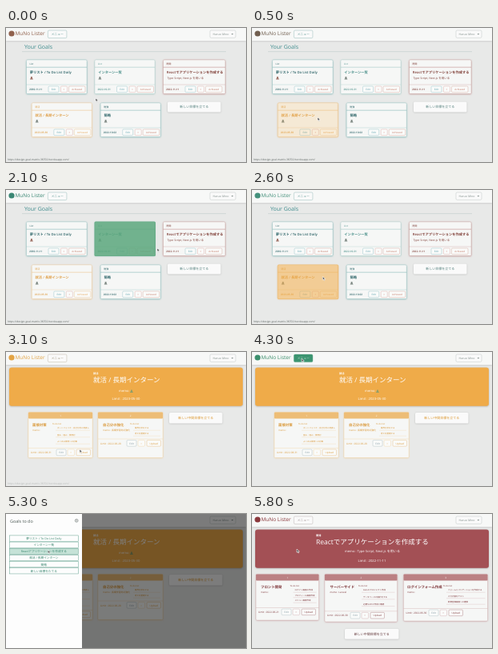
An HTML page for the animation above (6 s loop, 300 by 168 pixels).

```html
<!DOCTYPE html>
<html lang="ja">
<head>
<meta charset="utf-8">
<title>Goals</title>
<style>
html, body { margin: 0; width: 100%; height: 100%; overflow: hidden; background: #e8e9e8; }
svg { display: block; width: 100vw; height: 100vh; }
text { font-family: "Open Sans", "Noto Sans CJK JP", "Noto Sans CJK", sans-serif; text-rendering: geometricPrecision; }
</style>
</head>
<body>
<svg id="stage" viewBox="0 0 300 168"></svg>
<script>
const LOOP = 6000;
const TEAL = '#4a9798', RED = '#a35a58', ORANGE = '#efab49';

const rect = (x, y, w, h, fill, extra = '') =>
  `<rect x="${x}" y="${y}" width="${w}" height="${h}" fill="${fill}" ${extra}/>`;
const text = (x, y, size, fill, str, extra = '') =>
  `<text x="${x}" y="${y}" font-size="${size}" fill="${fill}" ${extra}>${str}</text>`;
const line = (x1, y, x2, color, w = 0.4) =>
  `<path d="M${x1} ${y}H${x2}" stroke="${color}" stroke-width="${w}"/>`;
const group = (id, body, extra = '') => `<g id="${id}" ${extra}>${body}</g>`;
const MID = 'text-anchor="middle"';
const BOLD = 'font-weight="600"';

function button(x, y, w, label, color, h = 7.6) {
  return rect(x, y, w, h, '#fafbfa', `rx="1.2" stroke="${color}" stroke-width=".35" stroke-opacity=".8"`) +
    text(x + w / 2, y + h / 2 + 1.1, 3.1, color, label, MID);
}

function glow(x, y, w, h, color) {
  return rect(x, y + .4, w, h, color, 'rx="1.5" opacity=".6" filter="url(#blur)"') +
    rect(x, y, w, h, '#f6f7f6', `rx="1.2" stroke="${color}" stroke-width=".5" stroke-opacity=".4"`);
}

const bag = (x, y, color) =>
  `<path d="M${x + 1} ${y}h1.8v1.2l1.1 2.4h-4l1.1-2.4z" fill="${color}" opacity=".8"/>`;

function addButton(x, y, w, h, label, color) {
  return rect(x, y + .5, w, h, '#777', 'rx="1.5" opacity=".35" filter="url(#blur)"') +
    rect(x, y, w, h, '#fafafa', 'rx="1.5"') +
    text(x + w / 2, y + h / 2 + 1.4, 4, color, label, MID + ' font-weight="500"');
}

// Goal cards of the home page
const goals = [
  { x: 25.5, y: 40, w: 75.5, c: TEAL, ink: '#2f666a', tag: 'List', name: '夢リスト / To Do List Daily', date: '2030-11-11' },
  { x: 111, y: 40, w: 75, c: '#78b0a9', ink: '#4c918b', fill: '#5aa67c', tag: 'List', name: 'インターン一覧', date: '2022-10-31' },
  { x: 196.5, y: 40, w: 77.5, c: RED, ink: '#804039', tag: '開発', name: 'Reactでアプリケーションを作成する', memo: 'Type Script, Next.js を用いる', date: '2022-11-11' },
  { x: 32.3, y: 94, w: 75, c: '#e6a95a', ink: '#dfa04a', fill: ORANGE, tag: '就活', name: '就活 / 長期インターン', date: '2023-05-30' },
  { x: 118.2, y: 94, w: 75, c: TEAL, ink: '#2f666a', tag: '勉強', name: '簡略', date: '2022-10-02' }
];

function goalCard(g, i) {
  const { x, y, w, c, ink } = g;
  const body = glow(x, y, w, 42.5, c) +
    text(x + 4, y + 6, 3, ink, g.tag) +
    line(x, y + 9.2, x + w, c, .4) +
    text(x + 4.3, y + 17, 4.25, ink, g.name, BOLD) +
    (g.memo ? text(x + 5, y + 24.2, 3.5, ink, g.memo) : bag(x + 4.5, y + 21, i ? '#65706b' : '#8a5143')) +
    line(x, y + 31, x + w, c, .2) +
    text(x + 3.5, y + 38, 3.15, ink, g.date, BOLD) +
    button(x + 27.5, y + 33, 13, 'Edit', '#5a9fab') +
    button(x + 43, y + 33, 8, '×', '#cf8178') +
    button(x + 53, y + 33, 20.5, 'Achieved', i === 3 ? '#e3a150' : '#c27865');
  const cover = g.fill
    ? group('cover' + i, rect(x - .5, y - .5, w + 1.5, 43.5, g.fill, 'rx="1.5"'), 'opacity="0"') : '';
  return body + cover;
}

const home = text(23, 25.6, 7, '#3f8d8e', 'Your Goals') +
  line(20, 29.6, 275, '#b7c7c4', .5) +
  goals.map(goalCard).join('') +
  addButton(202, 92.5, 66.5, 13, '新しい目標を立てる', '#55817e');

// Detail page pieces
function hero(color, x, memoY, tag, name, memo, limit) {
  return rect(4, 20, 292, 48.3, '#777', 'rx="3" opacity=".5" filter="url(#blur)"') +
    rect(4, 19.5, 292, 48.3, color, 'rx="3"') +
    text(x, 27.8, 3.2, '#fff', tag, BOLD) +
    text(x, 37.7, 8.5, '#fff', name, 'font-weight="500"') +
    text(150.5, memoY, 4.1, '#fff', memo, MID) +
    text(150, 60, 4.2, '#fff', limit, MID);
}

function stepCard(s, color, ink) {
  const { x, w, b, row, tx, col } = s, y = 75.5;
  return glow(x, y, w, b - y, color) +
    rect(x, y, w, 8, color, 'rx="1"') +
    text(x + w / 2, y + 5.2, 3, '#fff', s.n, MID) +
    text(tx, 93.2, 4.4, ink, s.name, BOLD) +
    text(tx, 99.3, 2.9, ink, s.memo) +
    text(col, 90.6, 2.7, ink, 'To do list') +
    s.todo.map((t, i) => text(col + 6, 96.3 + i * s.gap, 2.5, ink, t, 'font-weight="500"') +
      line(col + 4, 98.2 + i * s.gap, x + w - 3, color, .2)).join('') +
    line(x, row - 5.5, x + w, color, .25) +
    text(x + 3, row + 1.1, 3.1, ink, 'Limit : ' + s.date) +
    button(s.edit, row - 3.9, 12, 'Edit', '#8198a0') +
    button(s.edit + 14, row - 3.9, 8.5, '×', color) +
    button(s.edit + 25, row - 3.9, 17.5, 'Upload', ink);
}

const internSteps = [
  { n: 1, x: 28, w: 80, b: 132.5, row: 126, tx: 33, col: 58, edit: 63, gap: 8.5, name: '面接対策', memo: 'memo :', date: '2022-08-31',
    todo: ['ポートフォリオ・自己分析の見直し', '強み・弱み・質問対', 'よくある質問への対策'] },
  { n: 2, x: 115, w: 81, b: 132.5, row: 114.5, tx: 121, col: 155, edit: 151, gap: 7, name: '自己分の強化', memo: 'memo : 長期学習対応強化', date: '2022-06-28',
    todo: ['業界分析をする', '考えを整理する'] }
];
const reactSteps = [
  { n: 1, x: 5, w: 78.5, b: 133, row: 123, tx: 11, col: 47.5, edit: 37, gap: 6.5, name: 'フロント開発', memo: 'memo :', date: '2022-06-21',
    todo: ['ログイン画面の作成', 'プロフィール画面作成', 'メニュー画面作成'] },
  { n: 2, x: 91, w: 90.5, b: 135, row: 127.3, tx: 97.5, col: 133, edit: 123, gap: 8.7, name: 'サーバーサイド', memo: 'memo : Laravel', date: '2022-06-30',
    todo: ['Railsのプロジェクト作成', 'データベースの設計をする', '必要なAPIの作成と確認'] },
  { n: 3, x: 189.5, w: 105, b: 134, row: 124, tx: 194, col: 239, edit: 221, gap: 7.5, name: 'ログインフォーム作成', memo: 'memo :', date: '2022-06-30',
    todo: ['フォームとバリデーションを作成する', '入力内容をテスト', '新規登録画面への遷移'] }
];

const intern = hero(ORANGE, 109, 50.3, '就活', '就活 / 長期インターン', 'memo : &#160;&#160;&#160;', 'Limit : 2023-05-30') +
  bag(155, 47.4, '#7c9b6c') +
  group('internSteps', internSteps.map(s => stepCard(s, '#edbd76', '#d99737')).join('') +
    addButton(204, 76, 66.5, 13.5, '新しい中間目標を立てる', '#dc982f'));

const react = hero('#a35055', 80, 47.6, '開発', 'Reactでアプリケーションを作成する',
    'memo : Type Script, Next.js を用いる', 'Limit : 2022-11-11') +
  group('reactSteps', reactSteps.map(s => stepCard(s, '#bb8083', '#7c3236')).join('') +
    addButton(116, 144, 67.5, 12.8, '新しい中間目標を立てる', '#63383b'));

const header = rect(0, 0, 300, 16.6, '#777', 'opacity=".3" filter="url(#blur)"') +
  rect(0, 0, 300, 16, '#f7f8f7') +
  group('logo', '<circle cx="7" cy="7" r="3.6"/><text x="11.5" y="9.2" font-size="6.5">MuNo Lister</text>') +
  group('menu', '<rect x="52.4" y="3" width="23.5" height="9.6" rx="1.5" stroke-width=".35"/>' +
    `<text x="64.2" y="9.2" font-size="3.9" ${MID}>メニュー</text>`) +
  rect(255, 3, 32, 9.3, '#fafafa', 'rx="1.5" stroke="#a9b1af" stroke-width=".35"') +
  text(258.5, 8.9, 3.6, '#84908d', 'Haruo Mino') +
  '<path d="M281.5 7h2.8l-1.4 1.6z" fill="#84908d"/>';

// Side panel
const PANEL = 95, ROW = 8.15;
const rowY = i => 26.9 + i * ROW;
const rowNames = goals.map((g, i) => i === 2 ? 'Reactアプリケーションを作成する' : g.name)
  .concat('新しい目標をたてる');
const panel = rect(0, 0, PANEL, 168, '#fdfdfd') +
  text(5, 10.5, 5.4, '#4a5652', 'Goals to do') +
  '<circle cx="88.2" cy="8.3" r="1.9" fill="none" stroke="#4a5652" stroke-width=".5"/>' +
  '<path d="M87.4 7.5l1.6 1.6m0-1.6l-1.6 1.6" stroke="#4a5652" stroke-width=".4"/>' +
  rowNames.map((name, i) =>
    rect(4.3, rowY(i), 86, 7.3, '#fdfdfd', `id="row${i}" stroke="#65a28f" stroke-width=".5"`) +
    text(47.3, rowY(i) + 5, 3.7, '#3c8871', name, MID)).join('');

const stage = document.getElementById('stage');
stage.innerHTML =
  '<defs><filter id="blur" x="-20%" y="-20%" width="140%" height="150%"><feGaussianBlur stdDeviation="1.2"/></filter></defs>' +
  rect(0, 0, 300, 168, '#e8e9e8') + header +
  group('home', home) + group('intern', intern) + group('react', react) +
  group('url', text(2, 165.6, 3.3, '#5c6461', 'https://design-goal-matrix-38702.herokuapp.com/')) +
  group('shade', rect(0, 0, 300, 168, '#000')) +
  group('panel', panel) +
  group('cursor', '<path d="M0 0v4.2l1.1-1 .8 1.8.7-.3-.8-1.8h1.5z" fill="#444" stroke="#fff" stroke-width=".6"/>');

const el = id => document.getElementById(id);
const show = (id, on) => el(id).setAttribute('display', on ? 'inline' : 'none');
const set = (node, attrs) => { for (const k in attrs) node.setAttribute(k, attrs[k]); };
const clamp = v => Math.max(0, Math.min(1, v));
const ramp = (t, from, to) => clamp((t - from) / (to - from));
const smooth = p => p * p * (3 - 2 * p);

// Values keyed by time: [time, ...numbers]
function track(keys, t, ease = p => p) {
  let i = 0;
  while (i < keys.length - 2 && t >= keys[i + 1][0]) i++;
  const a = keys[i], b = keys[i + 1], p = ease(ramp(t, a[0], b[0]));
  return a.slice(1).map((v, k) => v + (b[k + 1] - v) * p);
}

const inkKeys = [[0, 145, 98, 78], [1200, 69, 91, 83], [2100, 58, 135, 116], [2899, 75, 151, 128],
  [2900, 224, 164, 72], [3200, 228, 164, 67], [4200, 61, 145, 111], [5599, 55, 135, 104],
  [5600, 139, 57, 61], [6000, 139, 57, 61]];
const mouseKeys = [[0, 112, 88], [500, 82, 112], [950, 90, 112], [1200, 107, 109], [1500, 150, 72],
  [1850, 165, 66], [2100, 189, 73], [2500, 90, 108], [2900, 80, 112], [3100, 92, 122],
  [3600, 96, 106], [4200, 62, 8], [4600, 62, 9], [5000, 55, 36], [5400, 52, 47], [5800, 56, 44], [6000, 56, 44]];

function render(t) {
  const ink = `rgb(${track(inkKeys, t).map(Math.round)})`;
  set(el('logo'), { fill: ink });
  const over = t >= 4200 && t < 5600;
  const [box, label] = el('menu').children;
  const edge = t < 2900 ? '#69a09c' : t < 4200 ? '#a49a83' : '#a09394';
  set(box, { fill: over ? '#3c9470' : '#fafafa', stroke: over ? '#3c9470' : edge });
  set(label, { fill: over ? '#b7d9ca' : edge });

  show('home', t < 2900);
  show('intern', t >= 2900 && t < 5600);
  show('react', t >= 5600);
  show('internSteps', t >= 3000);
  show('reactSteps', t >= 5800);
  show('url', t < 3500);
  set(el('url'), { opacity: t < 2900 ? 1 : .35 });

  const cover = (i, v) => set(el('cover' + i), { opacity: v.toFixed(3) });
  cover(1, .93 * ramp(t, 1500, 1750) * (1 - ramp(t, 2080, 2330)));
  cover(3, .93 * Math.max(ramp(t, 450, 700) * (1 - ramp(t, 980, 1225)), ramp(t, 2450, 2700)));

  const open = t >= 4360 && t < 5600;
  const slide = 1 - (1 - ramp(t, 4360, 4660)) ** 2;
  show('panel', open);
  show('shade', open);
  set(el('panel'), { transform: `translate(${(PANEL * (slide - 1)).toFixed(2)} 0)` });
  set(el('shade'), { opacity: .5 * ramp(t, 4360, 4510) });

  const [mx, my] = track(mouseKeys, t, smooth);
  set(el('cursor'), { transform: `translate(${mx.toFixed(2)} ${my.toFixed(2)})` });
  rowNames.forEach((_, i) => {
    const hot = t > 4700 && my >= rowY(i) && my < rowY(i) + ROW;
    set(el('row' + i), { fill: hot ? '#c5e2d7' : '#fdfdfd' });
  });
}

function tick(now) {
  render(now % LOOP);
  requestAnimationFrame(tick);
}
render(0);
requestAnimationFrame(tick);
</script>
</body>
</html>
```
